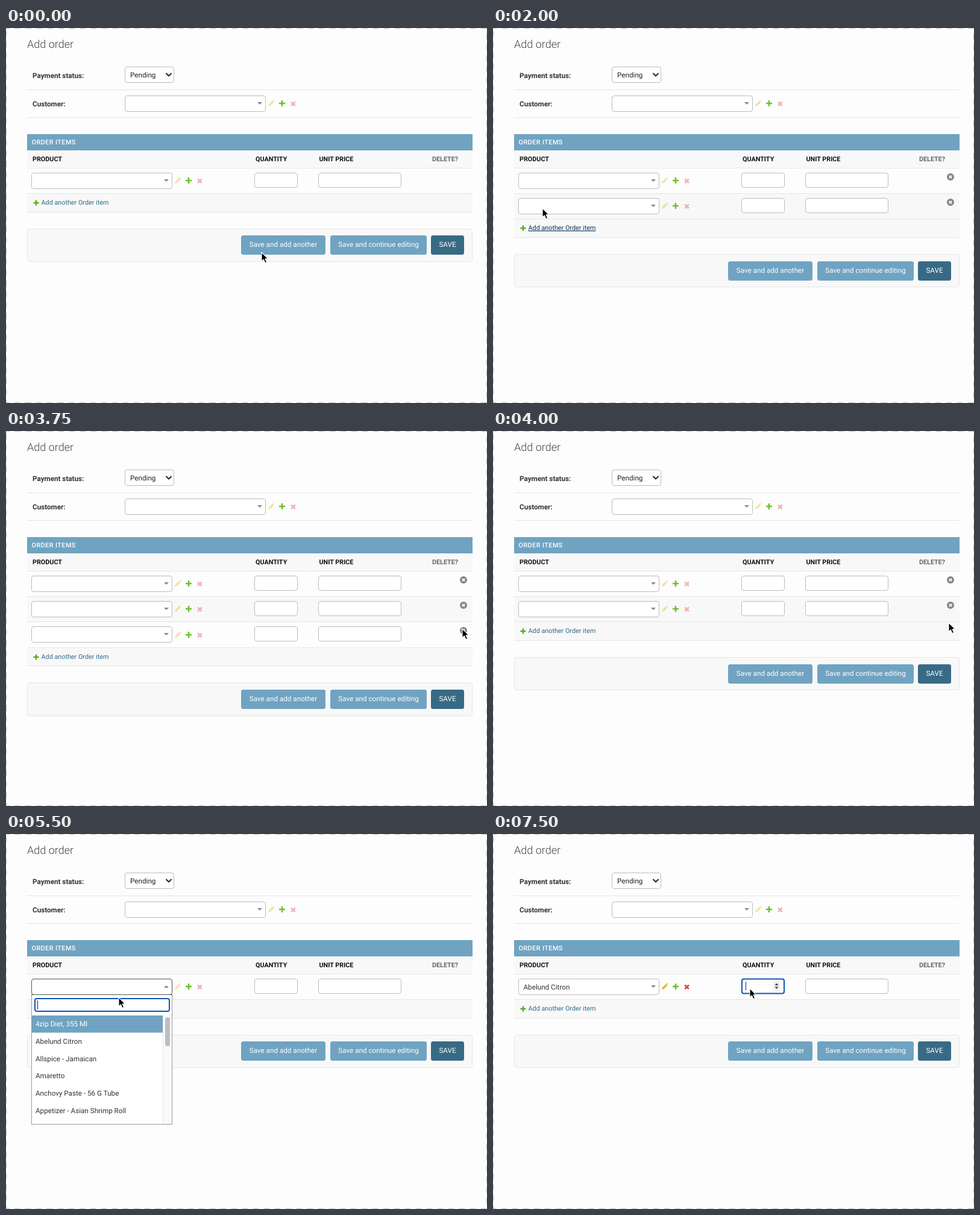
Recreate the animation shown at these times as an HTML page. Size 798 px wide and 622 px high, loop 8000 ms.

```html
<!DOCTYPE html>
<html lang="en">
<head>
<meta charset="utf-8">
<title>Add order</title>
<style>
html, body { margin: 0; width: 100%; height: 100%; overflow: hidden; background: #fdfdfd; }
svg { display: block; width: 798px; height: 622px; }
text { font-family: Roboto, "Liberation Sans", sans-serif; text-rendering: geometricPrecision; white-space: pre; }
</style>
</head>
<body>
<svg id="stage" viewBox="0 0 798 622"></svg>
<script>
const STEP = 250, LOOP = 8000;
const BLUE = '#70a3c2', FOCUS = '#0f55b8', GREY = '#f8f8f8', LINE = '#e6e6e6';
const ITEMS = ['4zip Diet, 355 Ml', 'Abelund Citron', 'Allspice - Jamaican', 'Amaretto',
  'Anchovy Paste - 56 G Tube', 'Appetizer - Asian Shrimp Roll'];

// Pointer tip at every step
const PATH = [
  [424, 372], [403, 362], [345, 337], [262, 309], [180, 287], [122, 278], [90, 286], [83, 290],
  [82, 299], [92, 316], [112, 331], [114, 334], [250, 345], [500, 352], [690, 343], [757, 328],
  [756, 318], [757, 291], [750, 284], [520, 271], [240, 262], [195, 258], [187, 271], [165, 300],
  [157, 325], [156, 341], [156, 346], [200, 335], [310, 300], [410, 262], [426, 256], [426, 256]
];

const rect = (x, y, w, h, fill, extra = '') =>
  `<rect x="${x}" y="${y}" width="${w}" height="${h}" fill="${fill}" ${extra}/>`;
const path = (d, fill, extra = '') => `<path d="${d}" fill="${fill}" ${extra}/>`;
const text = (x, y, str, { size = 11.7, weight = 400, fill = '#333', extra = '' } = {}) =>
  `<text x="${x}" y="${y}" font-size="${size}" font-weight="${weight}" fill="${fill}" ${extra}>${str}</text>`;
const rule = y => rect(35, y, 739, 1, LINE);
const field = (x, y, w, h, color = '#bcbcbc') =>
  rect(x + .5, y + .5, w - 1, h - 1, '#fff', `rx="3.5" stroke="${color}"`);
const focusField = (x, y, w, h) =>
  rect(x + 1, y + 1, w - 2, h - 2, '#fff', `rx="3" stroke="${FOCUS}" stroke-width="2"`);
const caret = (x, y, h) => rect(x, y, 1, h, '#222');

const plus = (x, y, r, fill) =>
  path(`M${x - r} ${y}h${2 * r}M${x} ${y - r}v${2 * r}`, 'none', `stroke="${fill}" stroke-width="2.6"`);
const cross = (x, y, r, stroke, width) =>
  path(`M${x - r} ${y - r}l${2 * r} ${2 * r}m0 ${-2 * r}l${-2 * r} ${2 * r}`, 'none',
    `stroke="${stroke}" stroke-width="${width}"`);

function relatedIcons(x, y, active) {
  const faded = `opacity="${active ? 1 : .4}"`;
  return `<g ${faded}>` +
    path(`M${x - 5} ${y + 5}l1-3.6 6-6 2.6 2.6-6 6zM${x + 2.7} ${y - 5.2}l1-.8 2 2-.8 1z`, '#e9b62c') +
    cross(x + 36.5, y + .8, 3.3, '#dd4646', 2.7) + '</g>' + plus(x + 18, y, 5, '#70bf2b');
}

function combo(x, y, { value = '', open, focus } = {}) {
  const ax = x + 220, ay = y + 11;
  return field(x, y, 234, 27, focus ? '#555' : '#bcbcbc') +
    path(open ? `M${ax} ${ay + 4}h8l-4-4z` : `M${ax} ${ay}h8l-4 4z`, '#888') +
    text(x + 8.5, y + 18, value);
}

function button(x, y, w, label, fill = BLUE) {
  return rect(x, y, w, 32, fill, 'rx="3.5"') +
    text(x + w / 2, y + 19, label, { fill: '#fff', extra: 'text-anchor="middle"' });
}

function header() {
  const head = (x, str, fill = '#111') => text(x, 221, str, { size: 10.8, weight: 700, fill });
  return rect(.5, .5, 797, 621, '#fdfdfd', 'stroke="#bbb" stroke-dasharray="10 8" stroke-dashoffset="4"') +
    text(35, 33, 'Add order', { size: 18, weight: 300, fill: '#444' }) +
    text(44, 83, 'Payment status:', { weight: 700 }) +
    field(197, 64, 82, 27) + text(206, 82, 'Pending', { fill: '#222' }) +
    path('M266 75.5l4 4 4-4', 'none', 'stroke="#222" stroke-width="2" stroke-linecap="round" stroke-linejoin="round"') +
    rule(102) +
    text(44, 130, 'Customer:', { weight: 700 }) + combo(197, 112) + relatedIcons(440, 125) + rule(148) +
    rect(35, 176, 739, 27, BLUE) +
    text(42.5, 193, 'ORDER ITEMS', { size: 10.8, weight: 500, fill: '#fff', extra: 'letter-spacing=".45"' }) +
    rect(35, 203, 739, 29, GREY) + rule(232) +
    head(44, 'PRODUCT') + head(414, 'QUANTITY') + head(519.5, 'UNIT PRICE') + head(707, 'DELETE?', '#666');
}

function orderRow(i, s) {
  const y = 240 + 42 * i, mid = Math.round(42.3 * i);
  const first = i === 0;
  return (i === 1 ? rect(35, 275, 739, 41, GREY) : '') + rule(274 + mid) +
    combo(42, y, first ? { value: s.chosen ? ITEMS[1] : '', open: s.open, focus: s.comboFocus } : {}) +
    relatedIcons(285, 253 + mid, first && s.chosen) +
    (first && s.typing ? focusField(412, 239.5, 72, 26) + rect(465, 244, 11, 17, '#f0f0f0', 'rx="2"') +
      path('M467.5 251h6l-3-3.4zM467.5 253.5h6l-3 3.4z', '#444') + (s.blink ? caret(419, 245, 14) : '')
      : field(412, y, 72, 25)) +
    field(518, y, 138, 25) +
    (s.rows > 1 ? `<circle cx="759" cy="${y + 7}" r="6" fill="#858585"/>` + cross(759, y + 7, 2.2, '#fff', 1.8) : '');
}

function footer(s) {
  const n = s.rows - 1, low = 42 * n, mid = Math.round(42.3 * n), high = Math.round(42.5 * n);
  const link = { size: 10.8, fill: s.hover ? '#0b3358' : '#2f6a8a', extra: s.hover ? 'text-decoration="underline"' : '' };
  return rect(35, 275 + mid, 739, 30 + low - mid, GREY) + rule(305 + low) +
    (s.open ? '' : plus(50, 290 + mid, 4.6, '#62ab26') + text(58.5, 293 + mid, 'Add another Order item', link)) +
    rect(35.5, 333.5 + low, 738, 54 + mid - low, GREY, `rx="3.5" stroke="${LINE}"`) +
    button(390, 344 + high, 140, 'Save and add another') +
    button(538, 344 + high, 160, 'Save and continue editing') +
    button(705, 344 + high, 55, 'SAVE', '#386a86');
}

function dropdown(s) {
  const top = 301 + 28.8 * s.marked;
  return rect(42.5, 266.5, 233, 215, '#fff', 'stroke="#999"') + rect(42, 266, 234, 1, '#555') +
    focusField(47, 272, 225, 23) + (s.blink ? caret(52, 276, 15) : '') +
    rect(43, top, 217, 28.5, BLUE) +
    ITEMS.map((item, i) => text(49, 319 + 28.8 * i, item, { fill: i === s.marked ? '#fff' : '#333' })).join('') +
    rect(260, 301, 15, 180, '#f9f9f9') + rect(260, 301, 1, 180, LINE) +
    rect(264, 304, 8, 48, '#bdbdbd', 'rx="4"');
}

const pointer = ([x, y]) =>
  path(`M${x} ${y}v15l3.4-3.2 2.5 5.8 2.7-1.2-2.5-5.6h4.6z`, '#000', 'stroke="#fff" stroke-width="1.1" stroke-linejoin="round"');

function stateAt(t) {
  const within = (a, b) => t >= a && t < b;
  const focusStart = t < 7250 ? 5250 : 7250;
  return {
    rows: within(2750, 4000) ? 3 : within(1750, 4500) ? 2 : 1,
    hover: within(1500, 2250) || within(2500, 3000),
    open: within(5250, 6500),
    marked: t < 6250 ? 0 : 1,
    chosen: t >= 6500,
    comboFocus: within(5250, 7250),
    typing: t >= 7250,
    blink: (t - focusStart) % 1000 < 500
  };
}

function render(step) {
  const s = stateAt(step * STEP);
  let out = header();
  for (let i = 0; i < s.rows; i++) out += orderRow(i, s);
  out += footer(s);
  if (s.open) out += dropdown(s);
  stage.innerHTML = out + pointer(PATH[step]);
}

const stage = document.getElementById('stage');
const start = performance.now();
let shown = -1;
function tick() {
  const step = Math.floor((performance.now() - start) % LOOP / STEP);
  if (step !== shown) render(shown = step);
  requestAnimationFrame(tick);
}
tick();
</script>
</body>
</html>
```
